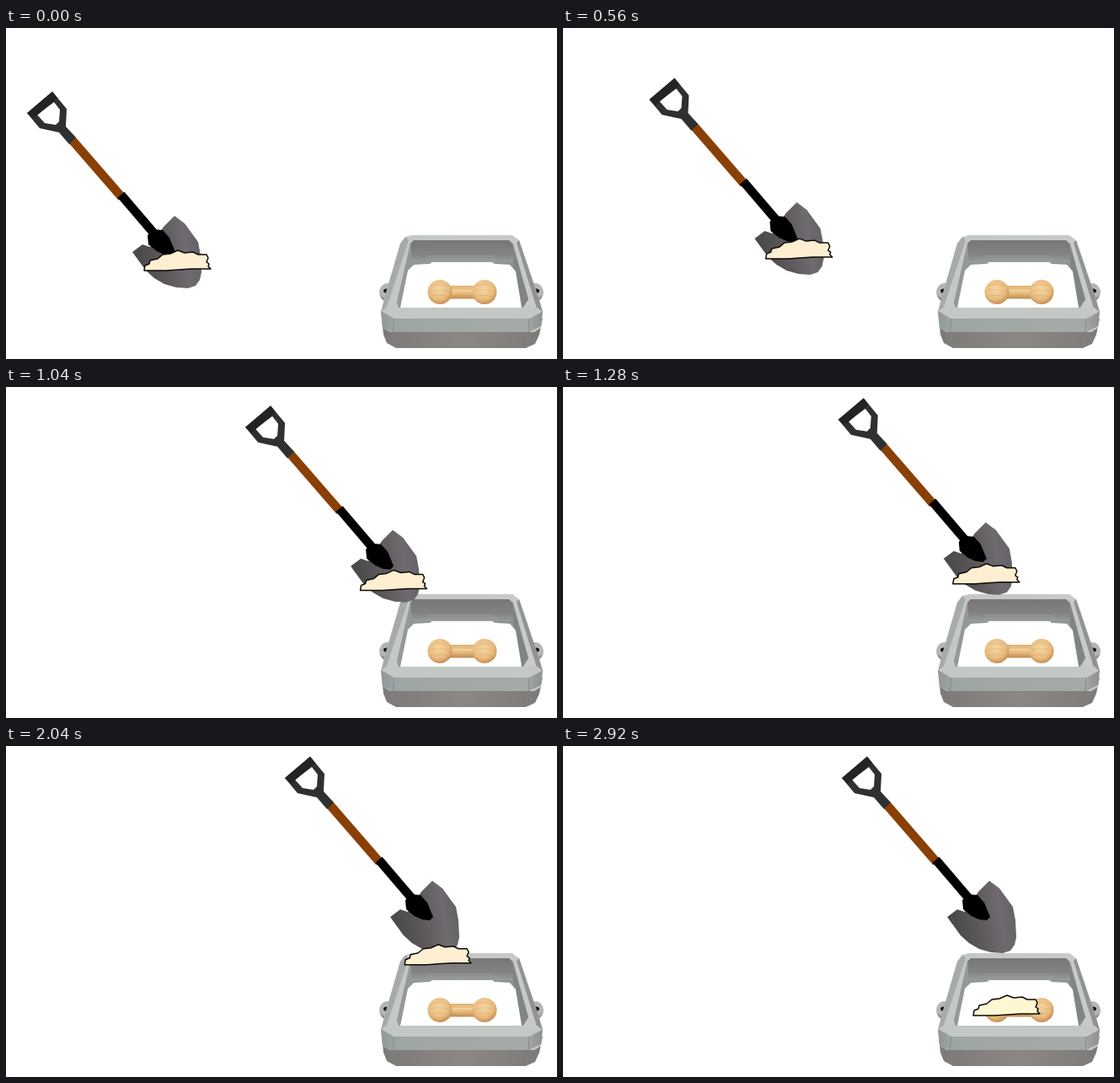
Animation of 654 by 393 pixels, one loop 5020 ms. Source, as an HTML page:

```html
<!DOCTYPE html>
<html lang="en">
<head>
<meta charset="utf-8">
<title>Shovel and box</title>
<style>
  @property --carry { syntax: "<number>"; inherits: true; initial-value: 0; }
  @property --drop { syntax: "<number>"; inherits: true; initial-value: 0; }

  html, body { margin: 0; width: 100%; height: 100%; overflow: hidden; background: #fff; }

  svg {
    display: block;
    width: 654px;
    height: 393px;
    animation: carry 5020ms linear infinite, drop 5020ms linear infinite;
  }

  #shovel { transform: translate(calc(var(--carry) * 306px), calc(var(--carry) * -63px)); }
  #sand {
    transform: translate(
      calc(var(--carry) * 303px + var(--drop) * 20px),
      calc(var(--carry) * -55px + var(--drop) * 87px));
    animation: tint 5020ms linear infinite;
  }

  @keyframes carry {
    0% { --carry: 0; }
    1.79% { --carry: 0; animation-timing-function: cubic-bezier(.333, 0, .667, .333); }
    7.17% { --carry: .088; animation-timing-function: cubic-bezier(.333, .22, .667, .54); }
    11.16% { --carry: .252; }
    14.34% { --carry: .484; animation-timing-function: cubic-bezier(.333, .4, .667, .73); }
    20.72% { --carry: .846; }
    22.31% { --carry: .915; animation-timing-function: cubic-bezier(.333, .667, .667, 1); }
    27.69%, 100% { --carry: 1; }
  }
  @keyframes drop {
    0%, 29.88% { --drop: 0; animation-timing-function: cubic-bezier(.333, 0, .667, .333); }
    43.63% { --drop: .5; animation-timing-function: cubic-bezier(.333, .667, .667, 1); }
    57.37%, 100% { --drop: 1; }
  }
  @keyframes tint {
    0%, 45% { fill: #ffefd2; }
    57.37%, 100% { fill: #fff7d3; }
  }
</style>
</head>
<body>
<svg viewBox="0 0 654 393">
  <defs>
    <linearGradient id="rim" x2="1" y2=".3">
      <stop offset="0" stop-color="#c3c7c5"/>
      <stop offset="1" stop-color="#c8cbc7"/>
    </linearGradient>
    <linearGradient id="front">
      <stop offset="0" stop-color="#8f9797"/>
      <stop offset=".08" stop-color="#9da5a4"/>
      <stop offset=".9" stop-color="#a6aaa7"/>
      <stop offset="1" stop-color="#8c908f"/>
    </linearGradient>
    <linearGradient id="base">
      <stop offset="0" stop-color="#7c7a78"/>
      <stop offset=".5" stop-color="#8b8784"/>
      <stop offset="1" stop-color="#7e7a78"/>
    </linearGradient>
    <linearGradient id="backWall" x2="0" y2="1">
      <stop offset="0" stop-color="#777776"/>
      <stop offset=".6" stop-color="#818281"/>
      <stop offset="1" stop-color="#9a9f9d"/>
    </linearGradient>
    <radialGradient id="ball" cx=".45" cy=".38" r=".65">
      <stop offset="0" stop-color="#f6d6a2"/>
      <stop offset=".65" stop-color="#e9bc80"/>
      <stop offset="1" stop-color="#c1864a"/>
    </radialGradient>
    <linearGradient id="bar" x2="0" y2="1">
      <stop offset="0" stop-color="#dfae6c"/>
      <stop offset=".4" stop-color="#f5d49c"/>
      <stop offset="1" stop-color="#c08a4c"/>
    </linearGradient>
    <linearGradient id="blade" gradientUnits="userSpaceOnUse" x1="160" y1="278" x2="232" y2="268">
      <stop offset="0" stop-color="#4d4a4c"/>
      <stop offset=".4" stop-color="#5c585b"/>
      <stop offset=".75" stop-color="#6f6a6f"/>
      <stop offset="1" stop-color="#656166"/>
    </linearGradient>
    <g id="knob">
      <circle r="14.5" fill="url(#ball)"/>
      <path d="M-10-7Q0-11 9-7M-12-1Q0-5 12 0M-11 5Q0 2 11 6" fill="none" stroke="#cf975a" stroke-width=".7" opacity=".5"/>
    </g>
    <g id="ear">
      <ellipse rx="10" ry="11" fill="#b4b5b8"/>
      <path d="M-9 3Q-6 11 1 11L6 8Q-3 9-9 3Z" fill="#8b8d90"/>
      <ellipse cx="-1" cy="-2" rx="4" ry="2.6" fill="#161616"/>
    </g>
  </defs>

  <g id="box">
    <use href="#ear" x="453" y="314"/>
    <use href="#ear" transform="translate(628 314) scale(-1 1)"/>
    <path d="M446 345L448 364 452 374 463 380H617L628 375 633 364 637 345Z" fill="url(#base)"/>
    <path d="M482 246H601L609 252 632 320 637 337 635 356 627 361H456L447 356 445 338 450 318 468 256 474 248Z" fill="url(#rim)"/>
    <path d="M474 248L468 256 450 318 445 337 451 334 478 252Z" fill="#a4abaa"/>
    <path d="M609 252L632 320 637 337 630 333 606 255Z" fill="#8f9493"/>
    <path d="M445 336L461 345H621L637 336 635 354 621 361H458L447 356Z" fill="url(#front)"/>
    <path d="M446 336L451 332H631L636 337 621 345H461Z" fill="#c3c8c4"/>
    <path d="M461 345L459 361 463 380M621 345L620 361 617 380" fill="none" stroke="#7f8584" stroke-width=".8"/>
    <path d="M484 252H597L602 256 620 322 614 332H466L464 326 480 256Z" fill="#8d9493"/>
    <path d="M484 252H597L601 257 603 278 482 279 480 256Z" fill="url(#backWall)"/>
    <path d="M480 256L482 282 467 332 464 326Z" fill="#929a98"/>
    <path d="M601 257L602 280 613 332 620 322Z" fill="#7f8585"/>
    <path d="M468 332L477 288 484 281 503 280 506 278H577L580 280 598 281 605 289 612 332Z" fill="#fff"/>
    <path d="M500 271H580M498 274H584M500 277H582" stroke="#9ca29f" stroke-width=".7"/>
  </g>

  <g id="bone">
    <rect x="526" y="306" width="32" height="15.5" fill="url(#bar)"/>
    <path d="M527 310H557M527 314Q542 312 557 315M527 318H557" fill="none" stroke="#cf975a" stroke-width=".7" opacity=".5"/>
    <use href="#knob" x="515" y="313.500"/>
    <use href="#knob" x="568" y="313.500"/>
  </g>

  <g id="shovel">
    <path d="M150 266L162 257 171 260 187 236 200 223 212 232 228 254 231 270 232 290 230 299 225 306 216 309 202 308 188 304 176 297 166 288Z" fill="url(#blade)"/>
    <path d="M78.500 133L137.500 201" stroke="#8a3f04" stroke-width="10.500"/>
    <path d="M136.500 198L177.500 246" stroke="#000" stroke-width="10.500"/>
    <path d="M168 246L175 239 186 240 194 249 201 266 197 270 188 269 179 265 169 257Z"/>
    <path fill-rule="evenodd" fill="#2f3030" d="M25 101L55 75.500 72 96 71 117 83 130 75 138 63 124 40 119ZM37 103L46 113 59 115 63 111 64 97 57 88Z"/>
    <path d="M25 101L55 75.500 61 83 32 108Z" fill="#222323"/>
  </g>

  <path id="sand" d="M164 288L165 282 170 280 171 276 180 274 186 269 195 268 204 264 212 267 222 266 228 269 238 269 240 273 238 278 241 280 240 283 243 286 238 286 220 286 190 288Z" fill="#ffefd2" stroke="#0c0a08" stroke-width="1.500" stroke-linejoin="round"/>
</svg>
</body>
</html>
```
